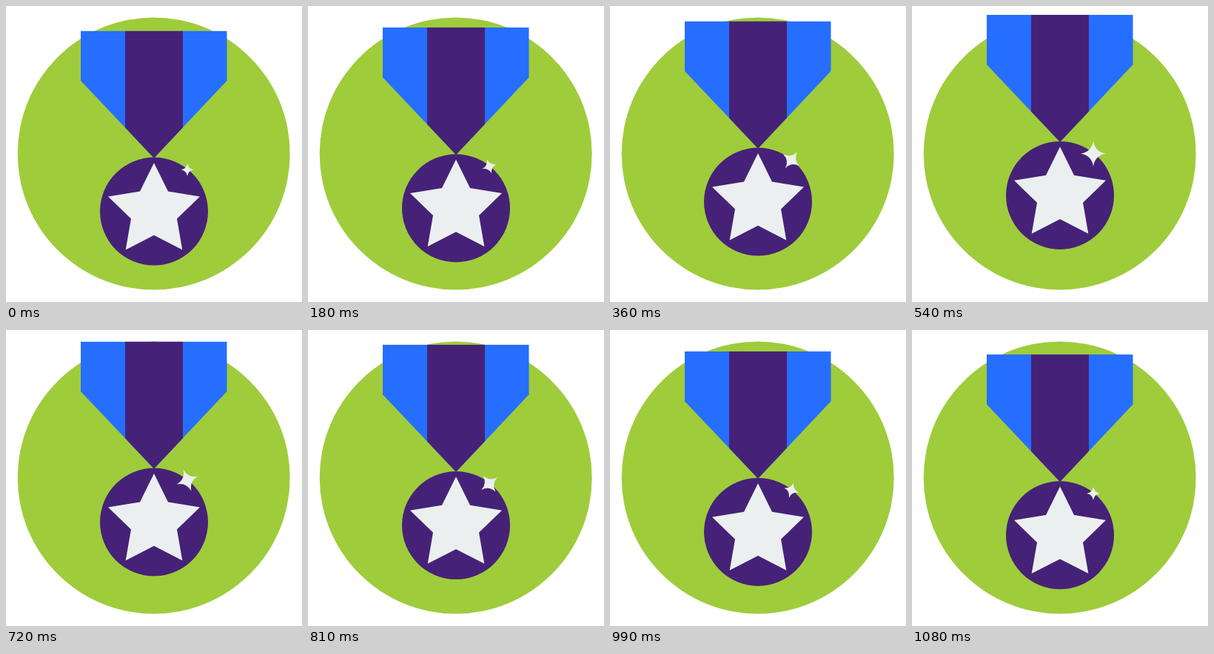
Write an HTML page that moves like this. It is 400 px wide and 400 px high and loops after 1170 ms.

```html
<!DOCTYPE html>
<html lang="en">
<head>
<meta charset="utf-8">
<title>Medal</title>
<style>
  html, body { margin: 0; width: 100%; height: 100%; overflow: hidden; background: #fff; }
  svg { display: block; width: 100%; height: 100%; }
</style>
</head>
<body>
<svg viewBox="0 0 400 400">
  <defs>
    <clipPath id="ribbon"><path d="M101 0H298.5V67.5L200 172L101 67.5Z"/></clipPath>
  </defs>
  <circle cx="199.7" cy="199.5" r="184" fill="#9fcc3b"/>
  <g id="medal">
    <g clip-path="url(#ribbon)">
      <rect x="101" width="198" height="172" fill="#266eff"/>
      <rect x="161" width="78" height="172" fill="#452277"/>
    </g>
    <circle cx="200" cy="244.2" r="73" fill="#452277"/>
    <path fill="#ebefef" d="M200 178.5L219 217L262 224L231 254L238.3 296L200 276.3L161.7 296L169 254L138 224L181 217Z"/>
    <path id="sparkle" fill="#ebefef" d="M0-1Q.14-.14 1 0Q.14 .14 0 1Q-.14 .14-1 0Q-.14-.14 0-1Z"/>
  </g>
</svg>
<script>
  const STEP = 90, STEPS = 13, TURN = 7;
  const medal = document.getElementById('medal');
  const sparkle = document.getElementById('sparkle');
  const mix = (a, b, p) => a + (b - a) * p;

  function draw(time) {
    const step = Math.floor(time / STEP) % STEPS;
    const rising = step < TURN;
    // Each half rests for one step at its start, then moves evenly.
    const p = Math.max(0, rising ? (step - 1) / 5 : (step - TURN) / 5);
    const top = rising ? mix(33.4, 11.7, p) : mix(11, 33.1, p);
    const radius = rising ? mix(8.5, 17, p) : mix(17, 8.8, p);
    const angle = rising ? mix(0, -90, p) : mix(-3, -90, p);
    medal.setAttribute('transform', `translate(0 ${top})`);
    sparkle.setAttribute('transform', `translate(245 187.8) rotate(${angle}) scale(${radius})`);
  }

  const start = performance.now();
  function tick() {
    draw(performance.now() - start);
    requestAnimationFrame(tick);
  }
  tick();
</script>
</body>
</html>
```
